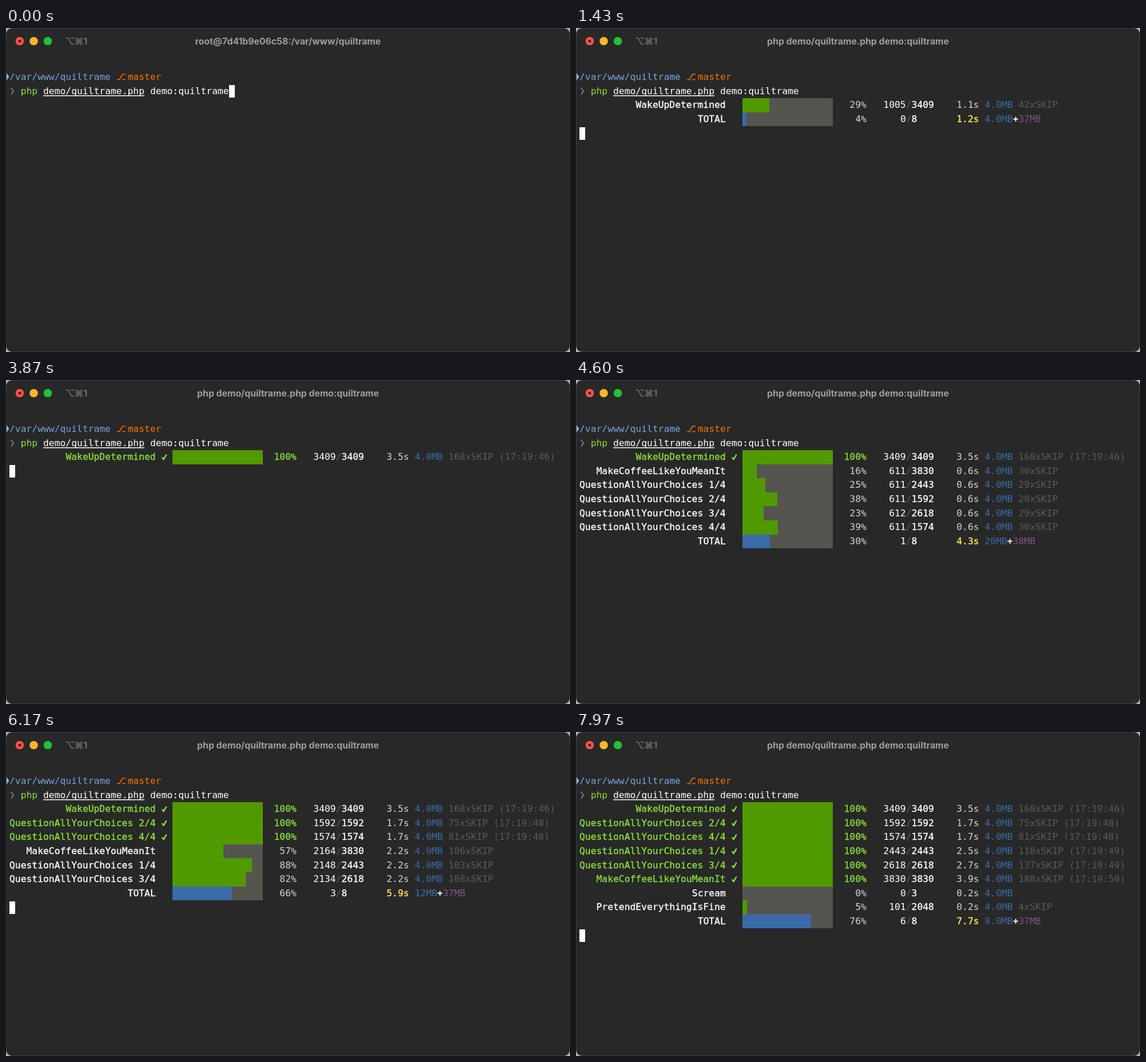
Animation, 986 px wide and 568 px high, one loop 8 s. Source, as an HTML page:

```html
<!DOCTYPE html>
<html lang="en">
<head>
<meta charset="utf-8">
<title>Terminal progress</title>
<style>
  html, body { margin: 0; width: 100%; height: 100%; overflow: hidden; background: #b5b5b5; }
  svg { display: block; width: 986px; height: 568px; }
  .mono { font: 16.34px "DejaVu Sans Mono", monospace; }
  .mono rect { shape-rendering: crispEdges; }
  .bold { stroke: currentColor; stroke-width: .35px; }
  .ui { font: 600 16px Inter, sans-serif; }
  #title { font-weight: 700; font-size: 15.8px; }
</style>
</head>
<body>
<svg viewBox="0 0 986 568">
  <rect x=".5" y=".5" width="985" height="567" rx="10" fill="#282828" stroke="#404040"/>
  <circle cx="24" cy="23" r="7.3" fill="#ff5148"/>
  <circle cx="24" cy="23" r="2.5" fill="#5c0805"/>
  <circle cx="48.5" cy="23" r="7.3" fill="#fdb32a"/>
  <circle cx="73" cy="23" r="7.3" fill="#24c138"/>
  <text class="ui" x="103.5" y="28.7" fill="#727272">⌥⌘1</text>
  <text class="ui" id="title" x="493" y="28.7" fill="#9e9e9e" text-anchor="middle"></text>
  <path d="M1 79L5.5 85.5L1 92Z" fill="#84bdf0"/>
  <path d="M194 90.5h4l6-9.5h5M203 90.5h6" fill="none" stroke="#ff6f00" stroke-width="1.6"/>
  <path d="M9 105l4 5.8l-4 5.8" fill="none" stroke="#7a7a7a" stroke-width="2"/>
  <path d="M65 118.7H242" stroke="#fff" stroke-width="1.4"/>
  <g class="mono" id="prompt"></g>
  <g class="mono" id="screen"></g>
</svg>
<script>
const LOOP = 8000, FPS = 30;
const CELL = 9.84, LINE = 24.6, LEFT = 6, TOP = 73.8;
const BAR_COL = 29, BAR_CELLS = 16;
const ENTER = 30, BOOT = 250, SECOND = 3965, THIRD = 7815;
const WHITE = '#fff', GREEN = '#8ae234', BLUE = '#3a6ba8', DIM = '#5a5b58', SOFT = '#d3d7cf';
const APP = 'quiltrame';
const COMMAND = `php demo/${APP}.php demo:${APP}`;

// points: [ms since start, items done, items skipped]
const tasks = [
  { name: 'WakeUpDetermined', total: 3409, start: 360, clock: '17:19:46',
    points: [[1070, 1005, 42], [2140, 2004, 99], [2340, 2192, 101], [3500, 3409, 168]] },
  { name: 'MakeCoffeeLikeYouMeanIt', total: 3830, start: SECOND, clock: '17:19:50',
    points: [[1565, 1508, 76], [2935, 2913, 141], [3850, 3830, 188]] },
  { name: 'QuestionAllYourChoices 1/4', total: 2443, start: SECOND, clock: '17:19:49',
    points: [[1565, 1508, 73], [2500, 2443, 118]] },
  { name: 'QuestionAllYourChoices 2/4', total: 1592, start: SECOND, clock: '17:19:48',
    points: [[1565, 1508, 70], [1650, 1592, 75]] },
  { name: 'QuestionAllYourChoices 3/4', total: 2618, start: SECOND, clock: '17:19:49',
    points: [[1565, 1509, 72], [2700, 2618, 137]] },
  { name: 'QuestionAllYourChoices 4/4', total: 1574, start: SECOND, clock: '17:19:48',
    points: [[1565, 1507, 76], [1660, 1574, 81]] },
  { name: 'Scream', total: 3, start: THIRD, points: [[3000, 3, 0]] },
  { name: 'PretendEverythingIsFine', total: 2048, start: THIRD, points: [[155, 101, 4], [2150, 2048, 95]] }
];
for (const task of tasks) task.length = task.points.at(-1)[0];

const title = document.getElementById('title');
const screen = document.getElementById('screen');

const colX = col => LEFT + col * CELL;
const rowY = row => TOP + row * LINE;
const seconds = ms => (Math.round(ms / 100) / 10).toFixed(1) + 's';
const percent = part => Math.round(part * 100) + '%';

function text(col, row, str, color, bold) {
  return `<text x="${colX(col)}" y="${rowY(row) + 17.2}" fill="${color}"` +
    `${bold ? ` class="bold" font-weight="bold" color="${color}"`.replace(' font-weight="bold"', '') : ''}>${str}</text>`;
}

function textEnd(col, row, str, ...style) {
  return text(col - String(str).length, row, str, ...style);
}

function rect(x, y, w, h, color) {
  return `<rect x="${x}" y="${y}" width="${w}" height="${h}" fill="${color}"/>`;
}

function bar(row, part, color) {
  const x = colX(BAR_COL), y = rowY(row);
  const eighths = Math.round(part * BAR_CELLS * 8);
  return rect(x, y, BAR_CELLS * CELL, LINE, '#555550') + rect(x, y, eighths * CELL / 8, LINE, color);
}

function cursor(col, row) {
  return rect(colX(col), rowY(row) + 1.4, CELL, 22, WHITE);
}

function counter(row, done, total) {
  return textEnd(58, row, done, WHITE) + text(58, row, '/', DIM) + text(59, row, total, WHITE, true);
}

function progress(task, time) {
  const ms = Math.min(time - task.start, task.length);
  let from = [0, 0, 0];
  for (const to of task.points) {
    if (ms <= to[0]) {
      const k = (ms - from[0]) / (to[0] - from[0]);
      const mix = i => Math.floor(from[i] + (to[i] - from[i]) * k + 1e-6);
      return { ms, done: mix(1), skipped: mix(2) };
    }
    from = to;
  }
}

function taskRow(task, row, time) {
  const { ms, done, skipped } = progress(task, time);
  const ready = ms === task.length, part = done / task.total;
  const y = rowY(row);
  let out = textEnd(26, row, task.name, ready ? GREEN : WHITE, true) +
    bar(row, part, '#509a00') +
    textEnd(51, row, percent(part), ready ? GREEN : SOFT, ready) +
    counter(row, done, task.total) +
    textEnd(71, row, seconds(ms), SOFT) +
    text(72, row, '4.0MB', BLUE);
  if (ready) out += `<path d="M272.8 ${y + 12.5}l2.8 3.5l5-8.5" fill="none" stroke="${GREEN}" stroke-width="2.4"/>`;
  if (skipped) out += text(78, row, `${skipped}xSKIP${ready ? ` (${task.clock})` : ''}`, DIM);
  return out;
}

function totalRow(row, time, finished, running) {
  const sum = running.reduce((acc, task) => acc + progress(task, time).done / task.total, finished);
  const part = sum / tasks.length;
  const used = running.length * 4;
  const memory = (used < 10 ? used.toFixed(1) : used) + 'MB';
  const plus = 72 + memory.length;
  return textEnd(26, row, 'TOTAL', WHITE, true) +
    bar(row, part, BLUE) +
    textEnd(51, row, percent(part), SOFT) +
    counter(row, finished, tasks.length) +
    textEnd(71, row, seconds((time - BOOT) * .994), '#fce94f', true) +
    text(72, row, memory, BLUE) +
    text(plus, row, '+', WHITE, true) +
    text(plus + 1, row, running.length > 4 ? '38MB' : '37MB', '#7d5585');
}

function draw(step) {
  const time = Math.round(step * 100 / FPS) * 10;
  title.textContent = time < ENTER ? `root@7d41b9e06c58:/var/www/${APP}` : COMMAND;
  if (time < ENTER) {
    screen.innerHTML = cursor(39, 1);
    return;
  }
  const end = task => task.start + task.length;
  const started = tasks.filter(task => time >= task.start);
  const finished = started.filter(task => time >= end(task)).sort((a, b) => end(a) - end(b));
  const running = started.filter(task => time < end(task));
  let row = 2, out = '';
  for (const task of [...finished, ...running]) out += taskRow(task, row++, time);
  if (running.length) out += totalRow(row++, time, finished.length, running);
  // the cursor flickers while the table is rewritten
  if (time < BOOT || step % 3) out += cursor(0, row);
  screen.innerHTML = out;
}

document.getElementById('prompt').innerHTML =
  text(0, 0, `/var/www/${APP}`, '#74a5dc') +
  text(21, 0, 'master', '#ff6f00') +
  text(2, 1, 'php', GREEN) +
  text(6, 1, `demo/${APP}.php`, WHITE) +
  text(25, 1, `demo:${APP}`, WHITE);

let last = -1;
const origin = performance.now();
function tick() {
  const time = (performance.now() - origin) % LOOP;
  const step = Math.floor((time + 5) * FPS / 1000) % (LOOP * FPS / 1000);
  if (step !== last) draw(last = step);
  requestAnimationFrame(tick);
}
tick();
</script>
</body>
</html>
```
